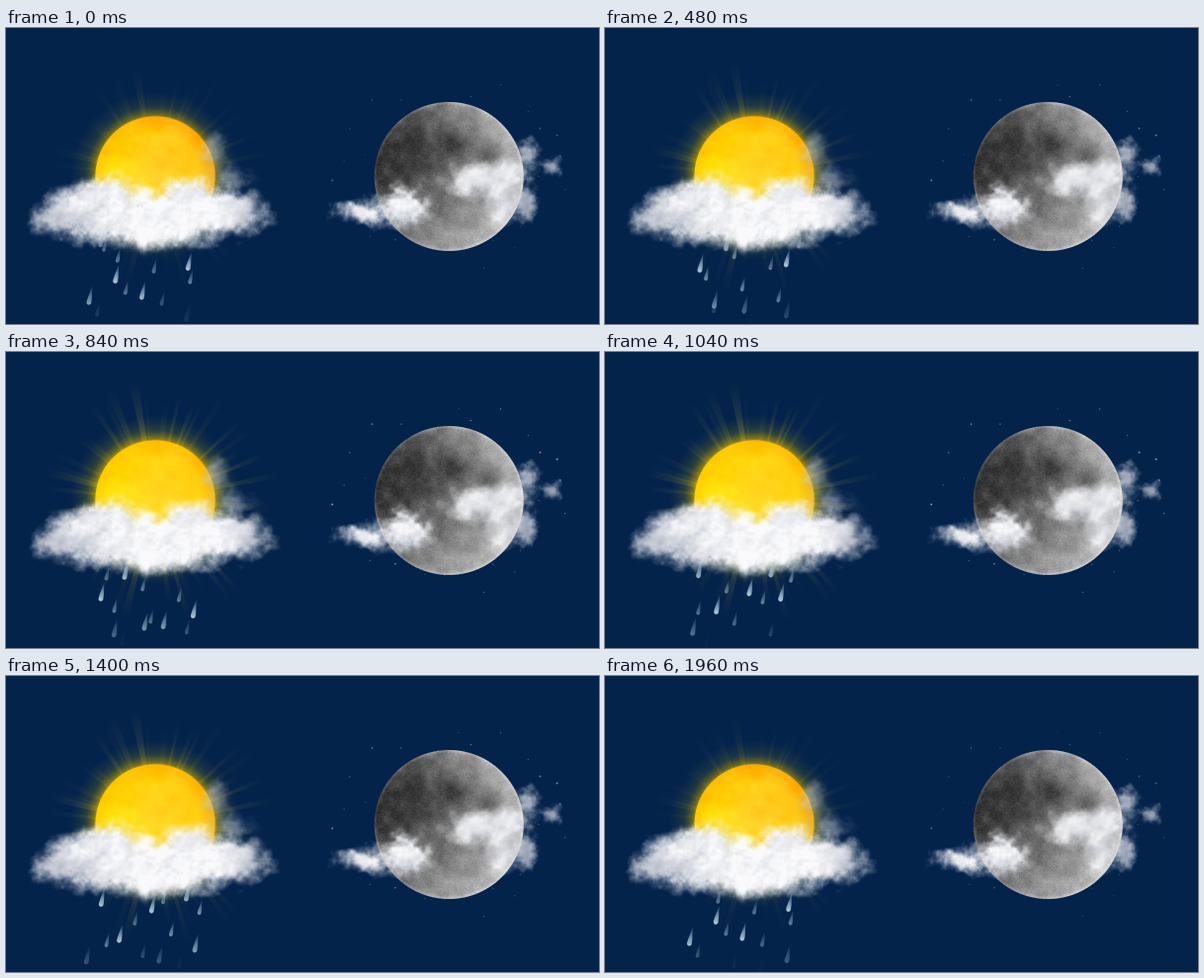
An HTML page with a canvas for the animation above (2000 ms loop, 600 by 300 pixels).

```html
<!DOCTYPE html>
<html lang="en">
<head>
<meta charset="utf-8">
<title>Sun and moon weather</title>
<style>
  html, body { margin: 0; width: 100%; height: 100%; overflow: hidden; background: #04234b; }
  canvas { display: block; width: 600px; height: 300px; }
</style>
</head>
<body>
<canvas id="stage" width="600" height="300"></canvas>
<script>
const ctx = document.getElementById('stage').getContext('2d');
const LOOP = 2000, STEP = 40, FRAMES = LOOP / STEP, TAU = Math.PI * 2;
const SUN = { x: 151, y: 150, r: 60.5 };
const MOON = { x: 448.2, y: 150.5, r: 75.5 };

const clamp = (v, lo = 0, hi = 1) => Math.min(hi, Math.max(lo, v));
const smooth = (a, b, v) => { const t = clamp((v - a) / (b - a)); return t * t * (3 - 2 * t); };
const mix = (a, b, t) => a + (b - a) * t;
const bump = (x, y, cx, cy, r) => Math.exp(-((x - cx) ** 2 + (y - cy) ** 2) / (r * r));

function hash(x, y) {
  let h = Math.imul(x, 374761393) + Math.imul(y, 668265263);
  h = Math.imul(h ^ (h >>> 13), 1274126177);
  return ((h ^ (h >>> 16)) >>> 0) / 4294967296;
}

function noise(x, y) {
  const i = Math.floor(x), j = Math.floor(y);
  const u = smooth(0, 1, x - i), v = smooth(0, 1, y - j);
  return mix(mix(hash(i, j), hash(i + 1, j), u),
             mix(hash(i, j + 1), hash(i + 1, j + 1), u), v);
}

function fbm(x, y) {
  let sum = 0, amp = 0.5;
  for (let k = 0; k < 5; k++) {
    sum += amp * noise(x, y);
    x = x * 2.03 + 17; y = y * 2.03 + 31; amp *= 0.52;
  }
  return sum;
}

// Paints a shader (x, y) => [r, g, b, alpha] once into its own canvas.
function sprite(x0, y0, w, h, shade) {
  const el = document.createElement('canvas');
  el.width = w; el.height = h;
  const c = el.getContext('2d'), img = c.createImageData(w, h);
  for (let y = 0, i = 0; y < h; y++) {
    for (let x = 0; x < w; x++, i += 4) {
      const px = shade(x0 + x + 0.5, y0 + y + 0.5);
      for (let k = 0; k < 3; k++) img.data[i + k] = px[k];
      img.data[i + 3] = clamp(px[3]) * 255;
    }
  }
  c.putImageData(img, 0, 0);
  return { draw: (dx = 0) => ctx.drawImage(el, x0 + dx, y0) };
}

// A cloud is a soft union of ellipses [cx, cy, rx, ry] with a noisy edge.
function cloud(lobes, { rough = 18, soft = 10, alpha = 1, light = 0.88, scale = 14, tone = () => 0 }) {
  const pad = 12, blend = 6;
  const x0 = Math.min(...lobes.map(([x, , rx]) => x - rx)) - pad;
  const x1 = Math.max(...lobes.map(([x, , rx]) => x + rx)) + pad;
  const y0 = Math.min(...lobes.map(([, y, , ry]) => y - ry)) - pad;
  const y1 = Math.max(...lobes.map(([, y, , ry]) => y + ry)) + pad;
  return sprite(x0, y0, x1 - x0, y1 - y0, (x, y) => {
    let sum = 0;
    for (const [cx, cy, rx, ry] of lobes) {
      const depth = (1 - Math.hypot((x - cx) / rx, (y - cy) / ry)) * Math.min(rx, ry);
      sum += Math.exp(depth / blend);
    }
    const edge = blend * Math.log(sum);
    if (edge < -rough) return [0, 0, 0, 0];
    const n = fbm(x / scale, y / scale);
    const relief = n - fbm((x - 2) / scale, (y - 4) / scale);
    const a = alpha * smooth(-3, soft, edge + (n - 0.5) * rough);
    const l = clamp(light + relief * 0.32 + (n - 0.5) * 0.3 + tone(x, y));
    return [mix(100, 250, l), mix(113, 250, l), mix(138, 252, l), a];
  });
}

const sun = sprite(88, 87, 126, 126, (x, y) => {
  const d = Math.hypot(x - SUN.x, y - SUN.y), q = d / SUN.r;
  const u = (x - SUN.x) / SUN.r, v = (y - SUN.y) / SUN.r;
  const n = fbm(x / 14, y / 14) - 0.5;
  const g = 214 - 12 * u + 20 * v + n * 34 - 20 * smooth(0.7, 1, q);
  const b = 50 * (1 - q) + 10 * u + n * 40;
  return [255, clamp(g, 0, 238), clamp(b, 0, 255), SUN.r - d + 0.5];
});

const seas = [[455, 118, 16, 48], [422, 116, 28, 22], [491, 128, 14, 50], [400, 145, 28, 12]];
const moon = sprite(371, 73, 155, 155, (x, y) => {
  const d = Math.hypot(x - MOON.x, y - MOON.y);
  const u = (x - MOON.x) / MOON.r, v = (y - MOON.y) / MOON.r;
  let l = 112 + 52 * u + 16 * v + 36 * v * v + 24 * Math.max(0, u);
  for (const [cx, cy, r, depth] of seas) l -= depth * bump(x, y, cx, cy, r);
  l += (fbm(x / 11, y / 11) - 0.5) * 62 + (hash(x | 0, y | 0) - 0.5) * 16;
  l += 26 * smooth(0.95, 1, d / MOON.r);
  l = clamp(l, 34, 228);
  return [l, l, l, MOON.r - d + 0.5];
});

const sunHaze = cloud([[209, 126, 15, 23], [226, 153, 22, 15]],
  { alpha: 0.5, light: 0.5, soft: 14 });

const sunCloud = cloud(
  [[100, 180, 51, 33], [140, 197, 84, 30], [186, 178, 39, 29], [231, 187, 37, 24], [52, 191, 26, 23]],
  { soft: 14, light: 0.9, tone: (x, y) =>
      0.1 * bump(x, y, 140, 190, 50) - 0.15 * bump(x, y, 75, 198, 26)
      - 0.32 * smooth(205, 265, x) - 0.3 * smooth(75, 30, x) - 0.1 * smooth(208, 230, y) });

const moonBack = cloud([[526, 126, 14, 15], [526, 176, 13, 18], [553, 141, 9, 10]],
  { alpha: 0.75, light: 0.72, rough: 16, scale: 10 });

const moonCloud = cloud([[483, 154, 42, 19], [507, 147, 17, 16], [505, 181, 18, 21]],
  { alpha: 0.9, soft: 13, scale: 15, tone: (x, y) => -0.2 * bump(x, y, 480, 174, 11) });

const sideCloud = cloud([[361, 186, 28, 13], [404, 185, 25, 18], [404, 168, 11, 8]],
  { light: 0.86, rough: 16, soft: 11, scale: 12, tone: (x, y) => -0.2 * smooth(188, 203, y) });

const rays = Array.from({ length: 44 }, (_, i) => ({
  angle: (i + hash(i, 3) * 0.9) / 44 * TAU,
  reach: 92 + 34 * hash(i, 7),
  half: 0.015 + 0.025 * hash(i, 11),
  power: 0.25 + 0.75 * hash(i, 19)
}));

function glow(x, y, r0, r1, a0, a1, stops) {
  const g = ctx.createRadialGradient(x, y, r0, x, y, r1);
  for (const [at, rgb, a] of stops) g.addColorStop(at, `rgba(${rgb},${a})`);
  ctx.fillStyle = g;
  ctx.beginPath();
  ctx.moveTo(x, y);
  ctx.arc(x, y, r1, a0, a1);
  ctx.fill();
}

function drawSun(p) {
  const { x, y, r } = SUN;
  for (const { angle, reach, half, power } of rays) {
    const a = (0.14 + 0.17 * p) * power;
    glow(x, y, 55, reach * (0.94 + 0.08 * p), angle - half, angle + half,
      [[0, '225,190,30', a], [0.45, '180,160,60', a * 0.5], [1, '140,135,70', 0]]);
  }
  glow(x, y, 58, 86, 0, TAU,
    [[0, '255,200,0', 0.78 + 0.1 * p], [0.16, '225,185,0', 0.44 + 0.1 * p],
     [0.45, '150,145,20', 0.18 + 0.08 * p], [1, '80,100,50', 0]]);
  sun.draw();
  glow(x, y, 0, r, 0, TAU, [[0, '255,232,20', 0.3 * p], [1, '255,232,0', 0.3 * p]]);
}

const stars = Array.from({ length: 28 }, (_, i) => {
  const angle = i * 2.4, reach = MOON.r + 4 + 38 * hash(i, 23);
  return {
    x: MOON.x + reach * 1.06 * Math.cos(angle), y: MOON.y + reach * 0.88 * Math.sin(angle),
    size: 0.5 + 0.5 * hash(i, 5), power: 0.4 + 0.7 * hash(i, 9)
  };
});

function drawStars(p) {
  for (const { x, y, size, power } of stars) {
    ctx.fillStyle = `rgba(205,218,235,${(0.35 + 0.35 * p) * power})`;
    ctx.beginPath();
    ctx.arc(x, y, size, 0, TAU);
    ctx.fill();
  }
}

// Each lane releases its drops evenly over the loop.
const FALL = 7, SLANT = 0.21, TOP = 220;
const lanes = [
  { x: 99, first: 0.9, count: 6 }, { x: 121, first: 4, count: 6 }, { x: 151, first: 3.3, count: 5 },
  { x: 172, first: 1, count: 4 }, { x: 187, first: 10, count: 4 }, { x: 200, first: 2.6, count: 4 }
];
const bigDrops = lanes.flatMap(({ x, first, count }, lane) =>
  Array.from({ length: count }, (_, i) => ({
    x: x + 8 * (hash(i, lane + 40) - 0.5), start: first + i * FRAMES / count, size: 1, power: 0.85
  })));
const smallDrops = Array.from({ length: 32 }, (_, i) => ({
  x: 100 + 102 * (i * 0.618 % 1), start: i * FRAMES / 32, size: 0.8, power: 0.4 + 0.2 * hash(i, 31)
}));
const drops = [...smallDrops, ...bigDrops];

function drawDrop({ x, start, size, power }, frame) {
  const age = (frame - start + FRAMES * 1.5) % FRAMES - FRAMES / 2;
  const fall = FALL * age, y = TOP + fall;
  const a = power * smooth(198, 228, y) * (1 - smooth(260, 297, y));
  if (a < 0.01) return;
  ctx.save();
  ctx.translate(x - SLANT * fall, y);
  ctx.rotate(SLANT);
  ctx.scale(size, size);
  const g = ctx.createLinearGradient(0, -11, 0, 9);
  g.addColorStop(0, `rgba(150,190,215,${a * 0.15})`);
  g.addColorStop(0.55, `rgba(178,210,228,${a * 0.75})`);
  g.addColorStop(1, `rgba(215,236,246,${a})`);
  ctx.fillStyle = g;
  ctx.beginPath();
  ctx.moveTo(0, -11);
  ctx.bezierCurveTo(1, -4, 2.4, 2, 2.4, 6);
  ctx.bezierCurveTo(2.4, 9.5, -2.4, 9.5, -2.4, 6);
  ctx.bezierCurveTo(-2.4, 2, -1, -4, 0, -11);
  ctx.fill();
  ctx.restore();
}

function render(frame) {
  const p = (1 - Math.cos(frame / FRAMES * TAU)) / 2, drift = 2.4 * p;
  ctx.fillStyle = '#04234b';
  ctx.fillRect(0, 0, 600, 300);

  drawSun(p);
  sunHaze.draw(drift);
  sunCloud.draw(drift);
  for (const drop of drops) drawDrop(drop, frame);

  moonBack.draw();
  moon.draw();
  moonCloud.draw(drift * 0.3);
  sideCloud.draw(drift);
  drawStars(p);
}

let last = -1;
function tick() {
  const frame = Math.floor(performance.now() % LOOP / STEP);
  if (frame !== last) render(last = frame);
  requestAnimationFrame(tick);
}
tick();
</script>
</body>
</html>
```
